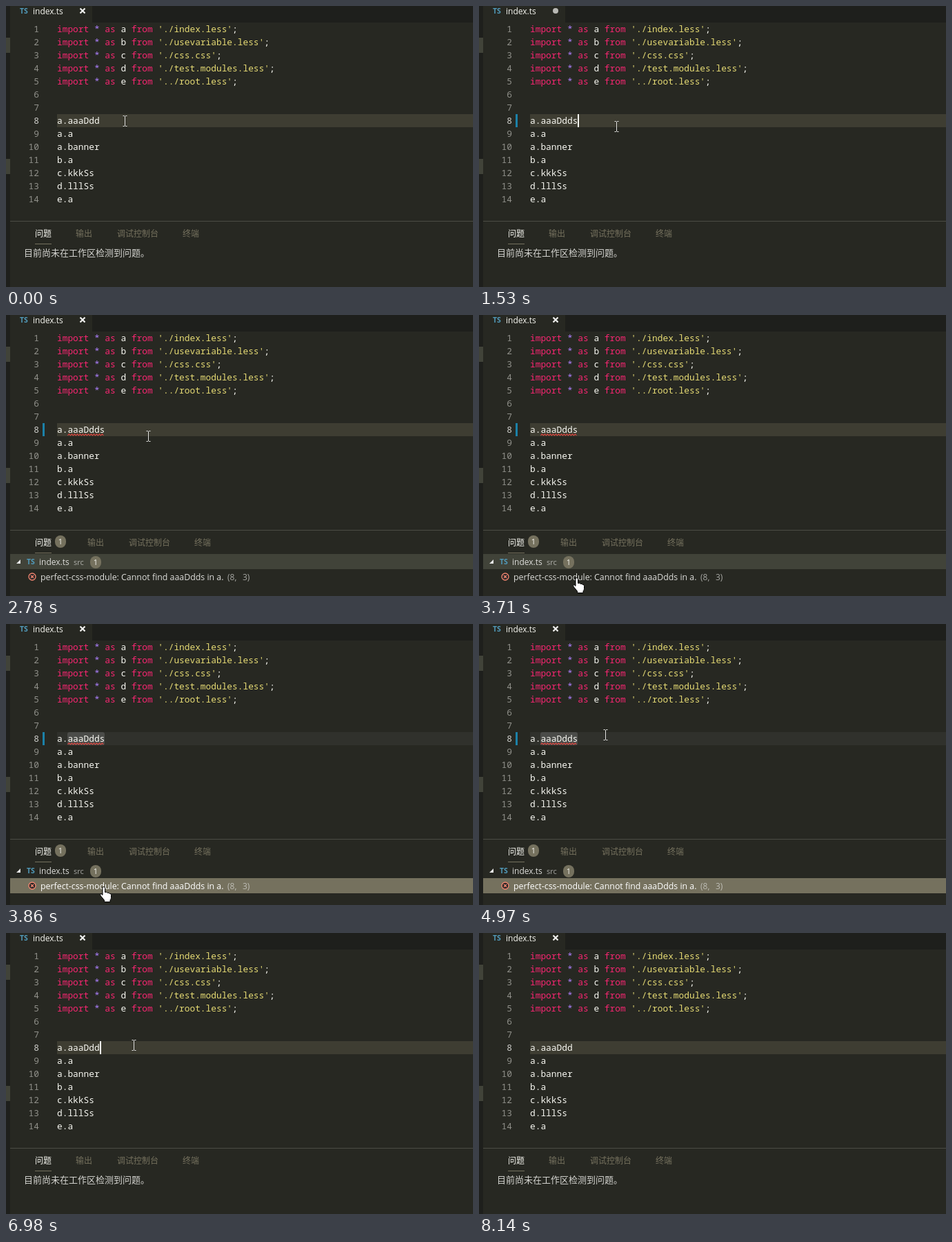
An HTML page that plays this animation: 677x408 px, repeating every 8.24 s.

```html
<!DOCTYPE html>
<html lang="zh">
<head>
<meta charset="utf-8">
<title>Editor diagnostics</title>
<style>
html, body { margin: 0; width: 100%; height: 100%; overflow: hidden; background: #272822; }
svg { display: block; width: 677px; height: 408px; }
text { white-space: pre; }
.code { font: 500 12.83px "Noto Sans Mono", "DejaVu Sans Mono", monospace; fill: #f8f8f2; }
.num { fill: #90908a; text-anchor: end; }
.ui { font: 12px "Open Sans", "Noto Sans", sans-serif; fill: #ddddda; }
.cjk { font: 12px "Noto Sans CJK SC", "Noto Sans CJK", "Noto Sans", sans-serif; fill: #75715e; }
.ts { font: bold 10.5px "Open Sans", "Noto Sans", sans-serif; fill: #519aba; }
.badge { font-size: 11px; fill: #f8f8f2; text-anchor: middle; }
</style>
</head>
<body>
<svg id="stage" viewBox="0 0 677 408" xmlns="http://www.w3.org/2000/svg">
  <rect width="677" height="408" fill="#272822"/>
  <rect width="6" height="408" fill="#1e1f1c"/>
  <path d="M0 46h6v22h-6zM0 222h6v22h-6z" fill="#414339"/>
  <rect x="125" width="552" height="24" fill="#1e1f1c"/>
  <text class="ts" x="20" y="11">TS</text>
  <text class="ui" x="39" y="11.5" style="fill:#f8f8f2">index.ts</text>
  <path id="close" d="M107.5 3.5l7 7m0-7l-7 7" stroke="#f0f0ee" stroke-width="2.2"/>
  <circle id="dirty" cx="111" cy="7" r="4" fill="#b8b8b4"/>

  <rect id="line" x="74" y="157" width="603" height="19"/>
  <rect id="word" x="89" y="157" width="54" height="19" rx="3" fill="#4b4c49"/>
  <g id="code"></g>
  <path id="wave" fill="none" stroke="#e0443e" stroke-width="1.1"/>
  <rect id="gutter" x="53" y="157" width="3" height="19" fill="#1b81a8"/>
  <rect id="caret" y="157" width="2" height="19" fill="#f8f8f0"/>

  <path d="M6 312.5h671" stroke="#4b4c45"/>
  <text class="cjk" x="42" y="335" style="fill:#f8f8f2">问题</text>
  <path d="M42 345.5h24" stroke="#75715e"/>
  <g id="tabs" class="cjk">
    <text x="101" y="335">输出</text>
    <text x="161" y="335">调试控制台</text>
    <text x="256" y="335">终端</text>
  </g>
  <g id="count">
    <rect x="71" y="320" width="16" height="18" rx="8" fill="#75715e"/>
    <text class="ui badge" x="79" y="333">1</text>
  </g>
  <text id="empty" class="cjk" x="26" y="362.5" style="font-size:13px;fill:#d4d4d0">目前尚未在工作区检测到问题。</text>
  <g id="list">
    <rect id="row" x="6" width="671" height="22"/>
    <path d="M21 355v6h-6z" fill="#e8e8e8"/>
    <text class="ts" x="30" y="362">TS</text>
    <text class="ui" x="48" y="362.5">index.ts</text>
    <text class="ui" x="98" y="362.5" style="font-size:11px" opacity=".7">src</text>
    <rect x="122" y="350" width="16" height="18" rx="8" fill="#75715e"/>
    <text class="ui badge" x="130" y="363">1</text>
    <circle cx="38" cy="380" r="5" fill="#252526" stroke="#f48771" stroke-width="1.3"/>
    <path d="M36 378l4 4m0-4l-4 4" stroke="#f48771" stroke-width="1.4"/>
    <text id="msg" class="ui" x="50" y="384.5" style="font-size:12.35px">perfect-css-module: Cannot find aaaDdds in a.</text>
    <text class="ui" y="384.5" opacity=".7"><tspan x="321">(8,</tspan><tspan x="343">3)</tspan></text>
  </g>

  <g id="beam" fill="none">
    <path d="M-3 -7.5h2.2l.8 .8l.8-.8h2.2M0-7v14M-3 7.5h2.2l.8-.8l.8 .8h2.2" stroke="#1a1a1a" stroke-width="2" opacity=".45"/>
    <path d="M-3 -7.5h2.2l.8 .8l.8-.8h2.2M0-7v14M-3 7.5h2.2l.8-.8l.8 .8h2.2" stroke="#e6e6e2"/>
  </g>
  <path id="hand" fill="#fff" stroke="#000" d="M-2 1.5q0-2 1.7-2t1.8 2v6q3-1 3.5 .9q2.600-.8 3 1q2.500-.4 2.500 2v4q0 2-1.500 3.500v2.600h-8.500v-2.400l-4.500-5.500q-2.500-3 -1-3.700q1.500-.5 3 1.600z"/>
  <path id="arrow" fill="#fff" stroke="#000" d="M.5 .5v16l3.700-3.500l2.500 5.500l2.300-1l-2.400-5.500h5z"/>
</svg>
<script>
const LOOP = 8240, CH = 7.7, LEFT = 74;
const $ = id => document.getElementById(id);
const esc = s => s.replace(/</g, "&lt;");

const imports = ["./index.less", "./usevariable.less", "./css.css", "./test.modules.less", "../root.less"];
const uses = ["a.aaaDdd", "a.a", "a.banner", "b.a", "c.kkkSs", "d.lllSs", "e.a"];
const paint = (color, s) => `<tspan fill="${color}">${esc(s)}</tspan>`;
const key = s => paint("#f92672", s);

const lines = [
  ...imports.map((path, i) =>
    `${key("import")} ${paint("#ae81ff", "*")} ${key("as")} ${"abcde"[i]} ${key("from")} ${paint("#e6db74", `'${path}'`)};`),
  "", "", ...uses
];
$("code").innerHTML = lines.map((line, i) => {
  const y = 38 + 19 * i;
  const shade = i === 7 ? ' style="fill:#d2d2cf"' : "";
  return `<text class="code num" x="48" y="${y}"${shade}>${i + 1}</text>` +
    `<text class="code" id="l${i + 1}" x="${LEFT}" y="${y}">${line}</text>`;
}).join("");

// time, x, y, cursor shape
const pointer = [
  [0, 172.5, 167, "beam"], [150, 171.5, 167, "beam"], [430, 170.5, 167, "beam"],
  [1010, 178, 169, "beam"], [1130, 188, 172, "beam"], [1250, 196, 174, "beam"], [1370, 199.5, 175, "beam"],
  [1680, 202.5, 175, "beam"], [1840, 206.5, 176, "beam"], [2930, 205.5, 179, "beam"],
  [3080, 182, 262, "beam"], [3200, 148, 364, "hand"], [3350, 149, 374, "hand"],
  [3470, 147, 385, "hand"], [3590, 143, 386, "hand"], [3710, 142, 382, "hand"],
  [4580, 234, 205, "beam"], [4700, 202.5, 149, "beam"], [4850, 196.5, 143, "beam"],
  [4970, 183.5, 161, "beam"], [5120, 185.5, 163, "beam"],
  [7230, 215.5, 181, "beam"], [7350, 380.5, 264, "beam"], [7470, 545, 358, "arrow"],
  [7620, 573, 393, "arrow"], [7740, 0, 0, "none"]
];
const caretOn = [[700, 1840], [2260, 2780], [3200, 3710], [5240, 6310], [6830, 7350], [7740, 8140]];

const show = (id, on) => $(id).setAttribute("visibility", on ? "visible" : "hidden");
const set = (id, attr, value) => $(id).setAttribute(attr, value);

function wave(from, to) {
  let d = `M${from} 175`;
  for (let x = from + 2, up = true; x <= to; x += 2, up = !up) d += `L${x} ${up ? 172.8 : 175}`;
  return d;
}

function render(t) {
  const within = (a, b) => t >= a && t < b;
  const typed = within(1250, 5790);
  const focused = within(3860, 5240);
  const error = within(2260, 6430);
  const dirty = within(1250, 2140) || within(5790, 6310);
  const end = LEFT + CH * (typed ? 9 : 8);

  $("l8").textContent = uses[0] + (typed ? "s" : "");
  show("close", !dirty);
  show("dirty", dirty);
  show("gutter", within(1530, 6040));
  set("line", "fill", focused ? "#30312c" : "#3e3d32");
  show("word", focused);
  show("wave", error);
  set("wave", "d", wave(LEFT + 2 * CH, end));
  set("caret", "x", Math.round(end));
  show("caret", caretOn.some(([a, b]) => within(a, b)));

  show("count", error);
  set("tabs", "transform", `translate(${error ? 17 : 0})`);
  const listed = within(2780, 6980);
  show("list", listed);
  show("empty", !listed);
  set("row", "y", t < 3860 ? 347 : 369);
  set("row", "fill", focused ? "#75715e" : "#414339");
  $("msg").style.fill = focused ? "#fff" : "";

  const [, x, y, shape] = pointer.filter(p => p[0] <= t).pop();
  for (const id of ["beam", "hand", "arrow"]) show(id, id === shape);
  if (shape !== "none") set(shape, "transform", `translate(${x} ${y})`);
}

const start = performance.now();
function tick() {
  render((performance.now() - start) % LOOP);
  requestAnimationFrame(tick);
}
tick();
</script>
</body>
</html>
```
